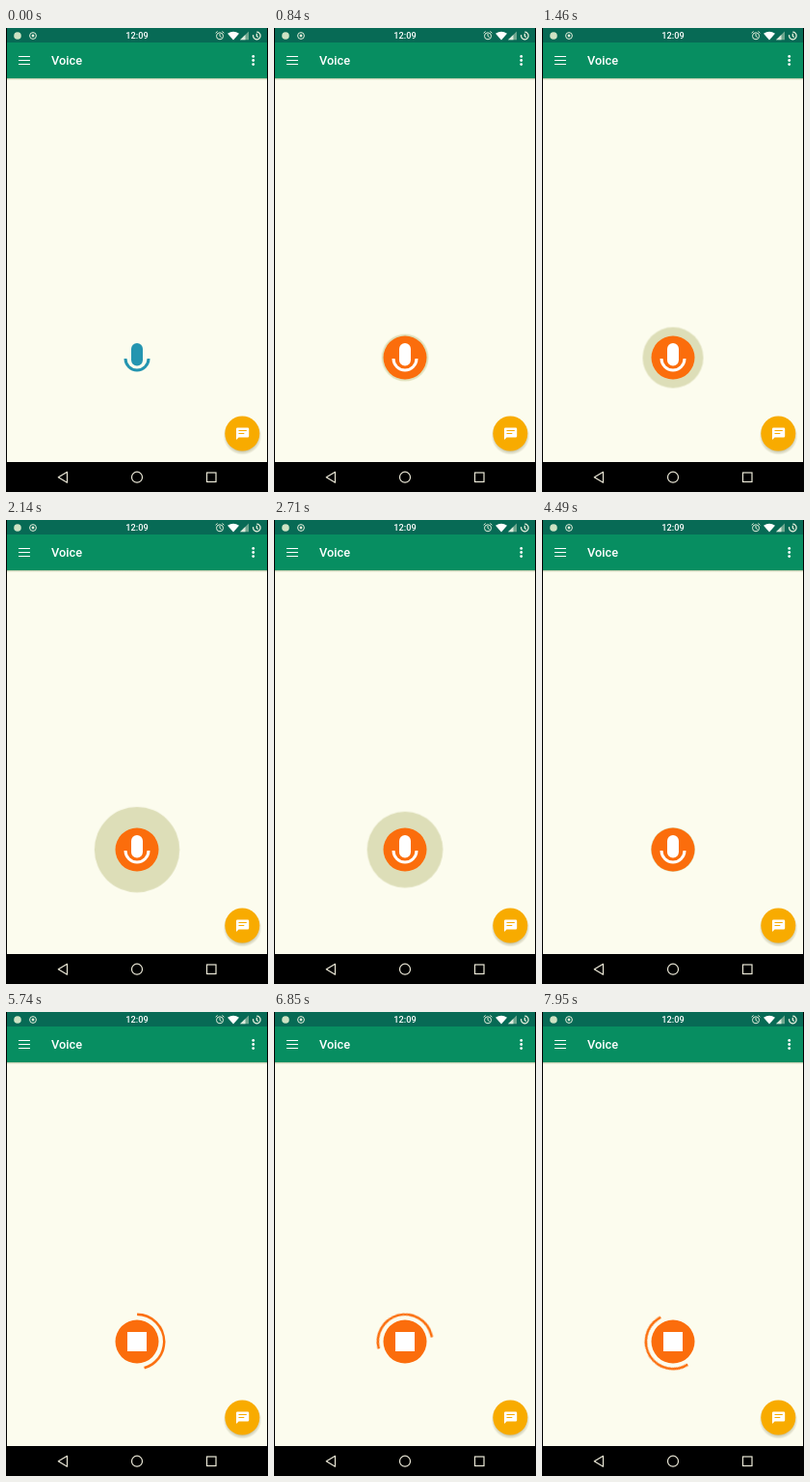
An HTML page for the animation above (8000 ms loop, 272 by 480 pixels).

```html
<!DOCTYPE html>
<html lang="en">
<head>
<meta charset="utf-8">
<title>Voice</title>
<style>
  html, body { margin: 0; width: 100%; height: 100%; overflow: hidden; background: #000; }
  svg { display: block; width: 100vw; height: 100vh; }
  text { font-family: Roboto, sans-serif; font-weight: 500; fill: #fff; }

  .mid { transform: translate(136px, 341px); }
  .anim { animation: 8s linear infinite; }
  .idle { animation-name: idle; }
  .active { animation-name: active; }
  .listen { animation-name: listen; }
  .busy { animation-name: busy; }
  .level { animation-name: level; animation-timing-function: ease-in-out; }
  .spin { animation-name: spin, sweep; }

  /* hard switches: idle, listening from 0.5 s, busy from 5.45 s */
  @keyframes idle {
    0%, 6.24% { visibility: visible; }
    6.25%, 100% { visibility: hidden; }
  }
  @keyframes active {
    0%, 6.24% { visibility: hidden; }
    6.25%, 100% { visibility: visible; }
  }
  @keyframes listen {
    0%, 6.24% { visibility: hidden; }
    6.25%, 68.12% { visibility: visible; }
    68.13%, 100% { visibility: hidden; }
  }
  @keyframes busy {
    0%, 68.12% { visibility: hidden; }
    68.13%, 100% { visibility: visible; }
  }

  /* sound level halo, base radius 10: swells, fades out, returns */
  @keyframes level {
    0%, 6.25% { transform: scale(2.25); }
    13% { transform: scale(2.5); }
    18.25% { transform: scale(3.15); }
    23.5% { transform: scale(4.85); }
    26.75% { transform: scale(4.42); }
    36.5% { transform: scale(3.85); }
    40.5% { transform: scale(4); }
    46.5% { transform: scale(3.6); }
    56.1% { transform: scale(2.3); }
    67%, 100% { transform: scale(3.3); }
  }

  /* the arc grows from the top, then turns steadily */
  @keyframes spin {
    0%, 71.75% { transform: rotate(-90deg); }
    100% { transform: rotate(428.5deg); }
  }
  @keyframes sweep {
    0%, 68.13% { stroke-dasharray: 0 360; }
    71.75% { stroke-dasharray: 164 196; }
    73%, 100% { stroke-dasharray: 186 174; }
  }
</style>
</head>
<body>
<svg viewBox="0 0 272 480" preserveAspectRatio="none">
  <defs>
    <linearGradient id="shade" x2="0" y2="1">
      <stop offset="0" stop-color="#6f8a58" stop-opacity=".5"/>
      <stop offset="1" stop-color="#6f8a58" stop-opacity="0"/>
    </linearGradient>
    <radialGradient id="drop">
      <stop offset=".78" stop-color="#75703c" stop-opacity=".4"/>
      <stop offset="1" stop-color="#75703c" stop-opacity="0"/>
    </radialGradient>
    <g id="mic">
      <rect x="-6" y="-15" width="12" height="23.5" rx="6" stroke="none"/>
      <path d="M-12 1A12 12 0 0 0 12 1" fill="none" stroke-width="3"/>
    </g>
  </defs>

  <rect width="272" height="480"/>
  <rect x="1" y="52" width="270" height="397" fill="#fcfcee"/>
  <rect x="1" y="52" width="270" height="2" fill="url(#shade)"/>
  <rect x="1" width="270" height="15" fill="#076a55"/>
  <rect x="1" y="15" width="270" height="37" fill="#078e61"/>

  <!-- status bar -->
  <circle cx="12" cy="8" r="3.8" fill="#cfe3c4"/>
  <g fill="none" stroke="#e6efdc">
    <circle cx="28" cy="8" r="3.4"/>
    <circle cx="222" cy="8.3" r="3.5"/>
    <path d="M222 6v2.5l1.6 1M217.6 5.2l2-1.7M226.4 5.2l-2-1.7"/>
    <path d="M260.3 4.2A3.8 3.8 0 1 1 256.6 7.2M260.3 5.8v2.4l1.4 1.4" stroke-width="1.3"/>
  </g>
  <circle cx="28" cy="8" r="1.4" fill="#e6efdc"/>
  <text x="136" y="11.2" font-size="9.2" text-anchor="middle">12:09</text>
  <path d="M230 5.8Q236 1.6 242 5.8L236 12.6Z" fill="#fff"/>
  <path d="M252 3.5V12.3H243Z" fill="#6fa78f"/>
  <path d="M248.5 7V12.3H243Z" fill="#dcebdc"/>

  <!-- app bar -->
  <path d="M13 29.5H25M13 33.5H25M13 37.5H25" stroke="#fff"/>
  <text x="47" y="38.4" font-size="12.8">Voice</text>
  <g fill="#fff">
    <circle cx="256.7" cy="29.4" r="1.4"/>
    <circle cx="256.7" cy="33.5" r="1.4"/>
    <circle cx="256.7" cy="37.6" r="1.4"/>
  </g>

  <!-- voice button -->
  <g class="mid">
    <use href="#mic" class="anim idle" fill="#2495b0" stroke="#2495b0"/>
    <g class="anim listen">
      <circle class="anim level" r="10" fill="#dddeb8"/>
    </g>
    <circle class="anim active" r="22.5" fill="#fb6d0c"/>
    <use href="#mic" class="anim listen" fill="#fff" stroke="#fff"/>
    <g class="anim busy">
      <rect x="-10" y="-10" width="20" height="20" fill="#fff"/>
      <circle class="anim spin" r="28.2" pathLength="360" fill="none" stroke="#fb6d0c" stroke-width="2.6"/>
    </g>
  </g>

  <!-- chat button -->
  <circle cx="245.5" cy="421.8" r="20" fill="url(#drop)"/>
  <circle cx="245.3" cy="419.5" r="18" fill="#f8ab00"/>
  <path d="M240.2 413.5H251a1.2 1.2 0 0 1 1.2 1.2V422.3a1.2 1.2 0 0 1-1.2 1.2H241.6L239 426V414.7a1.2 1.2 0 0 1 1.2-1.2Z" fill="#fff"/>
  <path d="M241.5 416.5H249.800M241.5 419.5H247.300" stroke="#f8ab00"/>

  <!-- navigation bar -->
  <g fill="none" stroke="#ece9d8" stroke-width="1.2">
    <path d="M63.5 459.300V470.200L54.300 464.700Z" stroke-linejoin="round"/>
    <circle cx="136" cy="464.700" r="5.5"/>
    <rect x="208.5" y="460" width="9.5" height="9.5"/>
  </g>
</svg>
</body>
</html>
```
